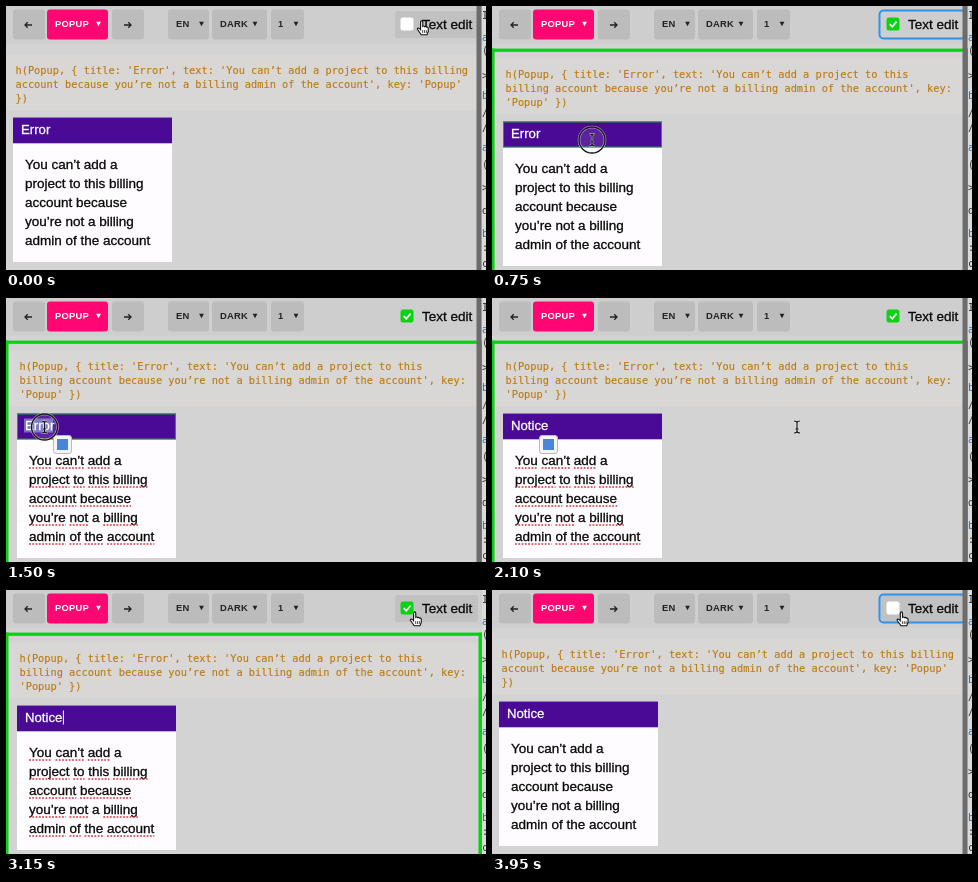
An HTML page for the animation above (4 s loop, 480x264 px).

```html
<!DOCTYPE html>
<html lang="en">
<head>
<meta charset="utf-8">
<title>Text edit mode</title>
<style>
  html, body { margin: 0; width: 100%; height: 100%; overflow: hidden; background: #d3d3d3; }
  svg { display: block; width: 480px; height: 264px; font-family: "Liberation Sans", Arial, sans-serif; }
  text { white-space: pre; }
  .btn rect { fill: #bcbcbc; }
  .btn text, .btn path { fill: #222; }
  .btn text { font-weight: bold; font-size: 9.4px; letter-spacing: .25px; }
  .btn.hot rect { fill: #ff0672; }
  .btn.hot text, .btn.hot path { fill: #fff; }
  .btn .arrow { fill: none; stroke: #222; stroke-width: 1.3; }
  .code text { font: 10.3px "DejaVu Sans Mono", monospace; fill: #bd7a12; stroke: #bd7a12; stroke-width: .15; }
  .side text { font: 10px "DejaVu Sans Mono", monospace; }
  .body { font-size: 13.5px; fill: #080808; stroke: #080808; stroke-width: .3; }
  #title { font-size: 13.2px; fill: #fff; stroke: #fff; stroke-width: .3; }
  .squiggle line { stroke: #d8343c; stroke-width: 1.7; stroke-dasharray: 1.8 1.5; }
</style>
</head>
<body>
<svg viewBox="0 0 480 264">
  <rect width="480" height="264" fill="#d3d3d3"/>
  <rect width="480" height="37.5" fill="#cecece"/>
  <g id="buttons"></g>

  <g id="label">
    <rect id="hover" x="389" y="5" width="83" height="27" rx="3" fill="#c1c1c1"/>
    <rect id="focus" x="387.5" y="4.5" width="86" height="28" rx="4" fill="none" stroke="#2b93ec" stroke-width="2"/>
    <rect id="box" x="394.5" y="11.5" width="13" height="13" rx="2.5"/>
    <path id="tick" d="M397.8 18.2l2.5 2.6 4.3-5.2" fill="none" stroke="#fff" stroke-width="1.7"/>
    <text class="body" x="416" y="23">Text edit</text>
  </g>

  <g id="content">
    <rect x="-10" y="49" width="500" height="55" fill="#d8d7d6"/>
    <g class="code" id="wide"></g>
    <g class="code" id="narrow"></g>
    <rect x="7" y="111.5" width="159" height="144.5" fill="#fefcfe"/>
    <rect x="7" y="111.5" width="159" height="25.8" fill="#4a0a96"/>
    <rect id="outline" x="7.5" y="112" width="158" height="25" fill="none" stroke="#209a3a"/>
    <rect id="selection" x="14" y="116.5" width="29" height="14" fill="#746cc0"/>
    <text id="title" x="15" y="127.7"></text>
    <rect id="caret" y="116.5" width="1" height="14" fill="#fff"/>
    <g id="copy"></g>
    <g class="squiggle" id="squiggle"></g>
  </g>

  <g id="frame" fill="#06d30f">
    <rect id="top" x="-1" y="42.6" width="477.5"/>
    <rect id="left" x="-.7" y="42.6" height="222"/>
    <rect id="right" y="42.6" height="222"/>
  </g>
  <rect id="strip" x="470.5" width="5" height="264" fill="#6c6c6c"/>
  <rect x="476" width="4" height="264" fill="#dadada"/>
  <g class="side" id="side"></g>

  <g id="helper">
    <rect x="47.5" y="137.5" width="18" height="18" rx="2.5" fill="#f4f4f6" stroke="#b9b9c0"/>
    <rect x="51" y="141" width="11" height="11" fill="#4a86d8"/>
  </g>

  <g id="pointer">
    <g id="ring" fill="none">
      <circle r="13" fill="#fff" fill-opacity=".1" stroke="#fff" stroke-opacity=".6" stroke-width="2.6"/>
      <circle r="13" stroke="#181818" stroke-width="1.4"/>
    </g>
    <path id="arrow" d="M-2-7v11.5l2.6-2.4 1.9 4.4 2.2-1-1.9-4.2H6.3z" fill="#000" stroke="#fff" stroke-width=".9"/>
    <g id="beam" fill="none">
      <path d="M-3-6Q0-6 0-4Q0-6 3-6M0-4V4M-3 6Q0 6 0 4Q0 6 3 6M-1.5 2H1.5" stroke="#fff" stroke-width="2.2" stroke-opacity=".8"/>
      <path d="M-3-6Q0-6 0-4Q0-6 3-6M0-4V4M-3 6Q0 6 0 4Q0 6 3 6M-1.5 2H1.5" stroke="#111" stroke-width="1.2"/>
    </g>
    <g id="hand" transform="scale(1.1)">
      <path d="M-2.2 1.5V-5.2q0-1.3 1-1.3t1 1.3V-1.5q1-.8 1.8.3 1-.6 1.7.4 1.3-.3 1.5 1.2V3L3.6 6.2H-1.6L-4.8 1.6q-.7-1.3.3-1.6 1-.1 2.3 1.5z" fill="#fff" stroke="#111" stroke-width="1"/>
      <path d="M-.3 2v2.5M1.4 2v2.5M3 2v2.5" stroke="#111" stroke-width=".7"/>
    </g>
  </g>
</svg>
<script>
const $ = id => document.getElementById(id);
const LOOP = 4000, STEP = 50;

const make = (parent, tag, attrs, content) => {
  const node = document.createElementNS("http://www.w3.org/2000/svg", tag);
  for (const key in attrs) node.setAttribute(key, attrs[key]);
  if (content) node.textContent = content;
  parent.appendChild(node);
  return node;
};
const lines = (parent, x, y, gap, rows, attrs) =>
  rows.map((row, i) => make(parent, "text", { x, y: y + i * gap, ...attrs }, row));

// Toolbar: x, width, caption, text x, caret x
[
  [7, 32, "", 0, 0], [41, 61, "POPUP", 49, 92.5], [106, 32, "", 0, 0],
  [162, 41, "EN", 170, 195.5], [206, 55, "DARK", 214, 249], [265, 33, "1", 272, 290]
].forEach(([x, width, caption, textX, caretX]) => {
  const g = make($("buttons"), "g", { class: caption === "POPUP" ? "btn hot" : "btn" });
  make(g, "rect", { x, y: 3.6, width, height: 29.8, rx: 3 });
  if (caption) {
    make(g, "text", { x: textX, y: 21.4 }, caption);
    make(g, "path", { d: `M${caretX - 2.4} 15.8h4.8l-2.4 4.4z` });
  } else {
    const dir = x < 50 ? 1 : -1, mid = x + 15.5;
    make(g, "path", { class: "arrow", d: `M${mid + 3.5 * dir} 19h${-7 * dir}m${2.7 * dir}-2.7l${-2.7 * dir} 2.7 ${2.7 * dir} 2.7` });
  }
});

lines($("wide"), 9.5, 67.6, 14, [
  "h(Popup, { title: 'Error', text: 'You can’t add a project to this billing",
  "account because you’re not a billing admin of the account', key: 'Popup'",
  "})"
]);
lines($("narrow"), 9.5, 67.6, 14, [
  "h(Popup, { title: 'Error', text: 'You can’t add a project to this",
  "billing account because you’re not a billing admin of the account', key:",
  "'Popup' })"
]);

lines($("copy"), 19, 163, 19, [
  "You can’t add a", "project to this billing", "account because",
  "you’re not a billing", "admin of the account"
], { class: "body" }).forEach((row, i) => {
  for (const word of row.textContent.matchAll(/\S+/g)) {
    const x = row.getStartPositionOfChar(word.index).x;
    const y = 166 + i * 19;
    if (word[0].length > 1)
      make($("squiggle"), "line", { x1: x, x2: x + row.getSubStringLength(word.index, word[0].length), y1: y, y2: y });
  }
});

// Slice of the editor behind the window
[
  ["I", 13], ["a", 35, 1], ["(", 48], [">", 73], ["b", 93, 1], ["/", 110], ["/", 125], ["a", 145, 1],
  ["(", 162], [">", 185], ["d", 208], ["b", 231, 1], [":", 245], ["c", 261]
].forEach(([glyph, y, blue]) => make($("side"), "text", { x: 476, y, fill: blue ? "#2a6fb5" : "#333" }, glyph));

const path = [
  [0, 417, 22], [150, 416, 21], [400, 223, 69], [700, 100, 134], [900, 100, 134], [1300, 38.5, 129],
  [1900, 38.5, 129], [2100, 305, 129], [2450, 410, 29], [3850, 410, 29], [4000, 411, 29]
];
const smooth = k => k * k * (3 - 2 * k);
const clamp = k => Math.min(1, Math.max(0, k));
const between = (t, a, b) => t >= a && t < b;

function pointerAt(t) {
  const i = path.findIndex(p => p[0] > t);
  const [t0, x0, y0] = path[i - 1], [t1, x1, y1] = path[i];
  const k = smooth((t - t0) / (t1 - t0));
  return [x0 + (x1 - x0) * k, y0 + (y1 - y0) * k];
}

function titleAt(t) {
  return t < 1600 ? "Error" : "Notice".slice(0, Math.floor((t - 1600) / STEP));
}

const show = (id, on) => { $(id).style.display = on ? "" : "none"; };
const set = (id, attr, value) => $(id).setAttribute(attr, value);

function render(t) {
  const [x, y] = pointerAt(t);
  const border = 4 * (clamp((t - 200) / 400) - clamp((t - 3450) / 400));
  const line = border * .8;
  const checked = between(t, 150, 3450);
  const overLabel = x > 389 && y < 33;
  const editing = between(t, 800, 3400);
  const beam = between(t, 600, 2250);

  set("content", "transform", `translate(${border} ${border})`);
  show("wide", border < 3);
  show("narrow", border >= 3);
  show("frame", border > 0);
  set("top", "height", line);
  set("left", "width", line);
  set("right", "x", 476.5 - border);
  set("right", "width", border);
  show("strip", !between(t, 2450, 3400));

  show("hover", overLabel);
  show("focus", between(t, 150, 800) || t >= 3450);
  set("box", "fill", checked ? "#0bd314" : "#fff");
  show("tick", checked);

  $("title").textContent = titleAt(t);
  show("outline", between(t, 650, 1950));
  show("selection", between(t, 1400, 1600));
  show("squiggle", editing);
  show("helper", between(t, 1450, 2450));
  const blink = (t + 850) % 1000 < 500;
  show("caret", between(t, 1600, 2000) || (between(t, 2000, 3400) && blink));
  set("caret", "x", 15.5 + $("title").getComputedTextLength());

  set("pointer", "transform", `translate(${x} ${y})`);
  show("hand", overLabel);
  show("beam", beam);
  show("arrow", !overLabel && !beam);
  show("ring", between(t, 100, 150) || between(t, 700, 850) || between(t, 1350, 1550) || between(t, 3400, 3450));
}

const start = performance.now();
function tick() {
  const t = (performance.now() - start) % LOOP;
  render(Math.floor(t / STEP) * STEP);
  requestAnimationFrame(tick);
}
tick();
</script>
</body>
</html>
```
